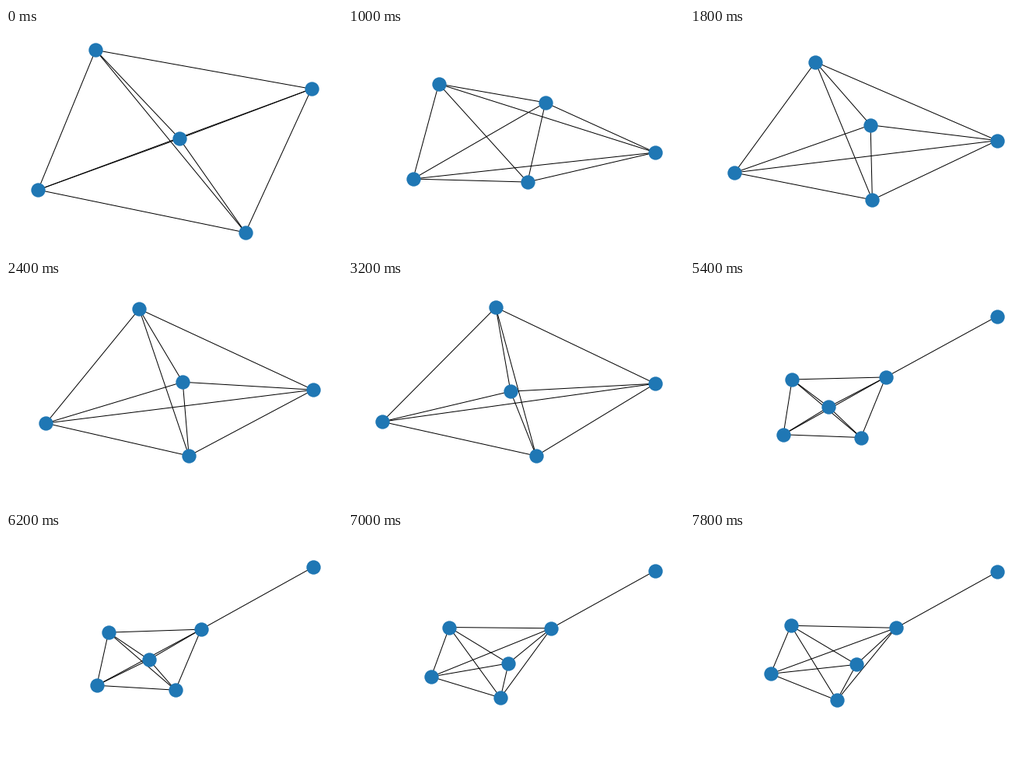
A matplotlib script for the animation above (8000 ms loop, 432 by 288 pixels).

```python
from itertools import combinations

import matplotlib.pyplot as plt
import numpy as np
from matplotlib.animation import FuncAnimation
from matplotlib.collections import LineCollection
from matplotlib.patches import Circle

W, H, DPI = 432, 288, 72
FRAMES, INTERVAL = 40, 200
RADIUS = 9.16  # node size 300 plus half of its outline
CENTER, SPAN = np.array([216, 144]), np.array([179, 119])

# Settled layouts (x, y in pixels) by step; the layout relaxes from one to the next.
POSES = {
    0: [(115, 28), (393, 78), (223, 142), (41, 208), (308, 263)],
    5: [(117, 72), (395, 160), (254, 96), (84, 194), (231, 198)],
    12: [(171, 37), (395, 141), (227, 131), (51, 184), (235, 226)],
    16: [(190, 35), (395, 133), (209, 143), (44, 182), (242, 226)],
    23: [(130, 124), (254, 124), (162, 160), (130, 203), (226, 200), (395, 51)],
    31: [(132, 129), (251, 125), (184, 164), (117, 197), (218, 203), (395, 45)],
    39: [(130, 120), (265, 123), (214, 170), (104, 182), (189, 216), (395, 51)],
}
POSES[17] = POSES[16] + [(232, 68)]  # a sixth node joins
STEPS = sorted(POSES)

CLIQUE = list(combinations(range(5), 2))
HUB, GUEST = 1, 5


def normalise(pos):
    """Center the layout and stretch it to the full span."""
    unit = (pos - pos.mean(axis=0)) / SPAN
    return CENTER + SPAN * unit / np.abs(unit).max()


def layout(step):
    i = min(np.searchsorted(STEPS, step, side="right"), len(STEPS) - 1)
    start, end = STEPS[i - 1], STEPS[i]
    a = np.array(POSES[start], float)
    b = np.array(POSES[end], float)[:len(a)]
    t = (step - start) / (end - start)
    return normalise(a + (b - a) * (1 - (1 - t) ** 2))


fig = plt.figure(figsize=(W / DPI, H / DPI), dpi=DPI, facecolor="white")
ax = fig.add_axes([0, 0, 1, 1])
ax.set_xlim(0, W)
ax.set_ylim(H, 0)
ax.axis("off")

edges = LineCollection([], colors="black", linewidths=1.0, zorder=1)
ax.add_collection(edges, autolim=False)
nodes = [ax.add_patch(Circle((0, 0), RADIUS, facecolor="#1f77b4", linewidth=0,
                             zorder=2)) for _ in range(6)]


def update(step):
    pos = layout(step)
    joined = len(pos) > GUEST
    pairs = CLIQUE + [(HUB, GUEST)] if joined else CLIQUE
    edges.set_segments([pos[list(pair)] for pair in pairs])
    for node, center in zip(nodes, pos):
        node.set_center(np.round(center) + 0.5)  # markers sit on whole pixels
    nodes[GUEST].set_visible(joined)
    return [edges, *nodes]


anim = FuncAnimation(fig, update, frames=FRAMES, interval=INTERVAL,
                     init_func=lambda: update(0), repeat=True, repeat_delay=0)
plt.show()
```
